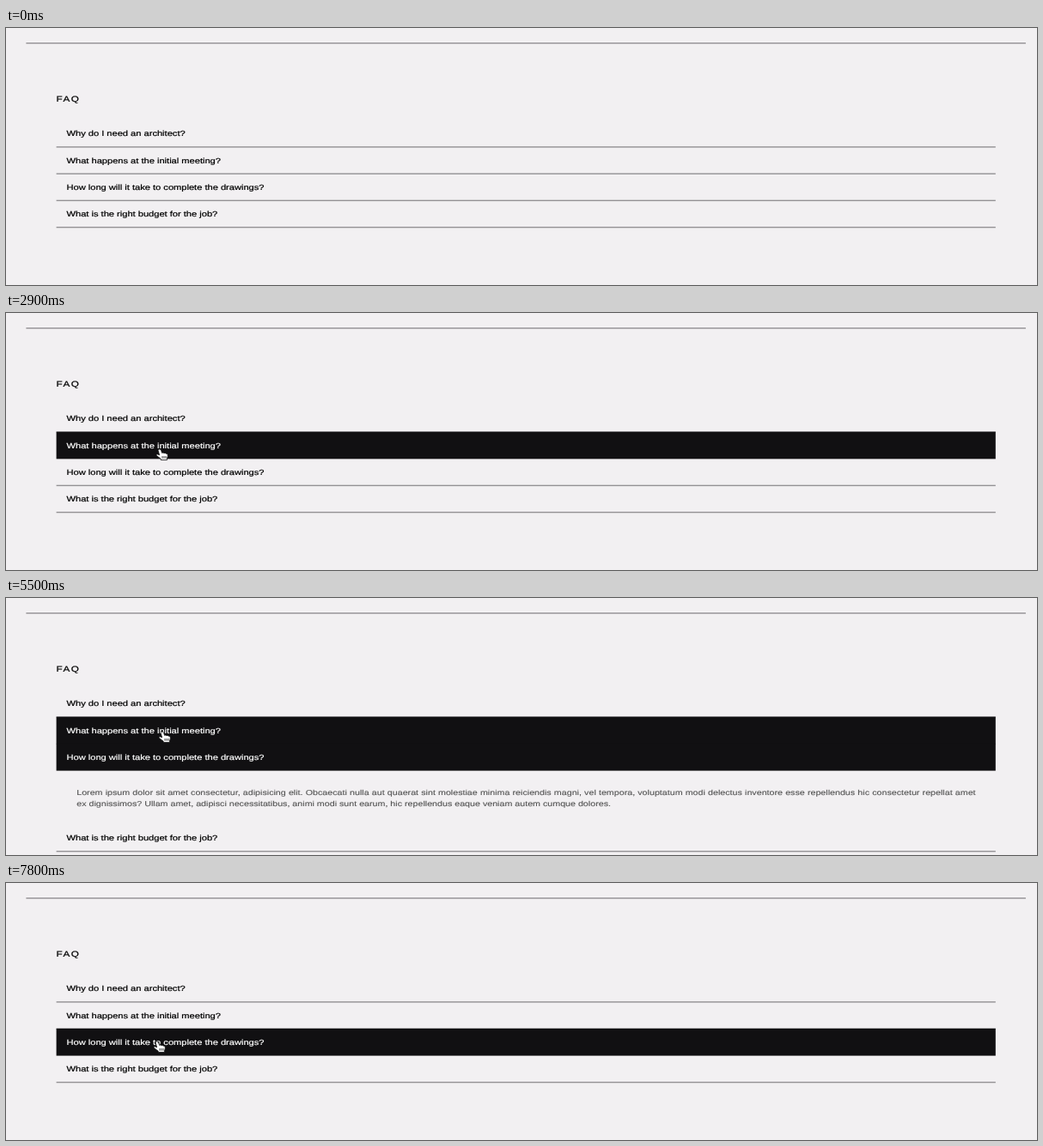
An HTML page for the animation above (8000 ms loop, 1200 by 300 pixels).

```html
<!DOCTYPE html>
<html lang="en">
<head>
<meta charset="utf-8">
<title>FAQ</title>
<style>
  html, body { margin: 0; width: 100%; height: 100%; overflow: hidden; background: #f2f0f2; }
  svg { display: block; width: 1200px; height: 300px; }
  text { font-family: "Liberation Sans", Arial, sans-serif; text-rendering: geometricPrecision; }
  .title { font-size: 9.36px; letter-spacing: 1.15px; stroke: #000; stroke-width: .2; }
  .ask { font-size: 8.9px; stroke-width: .2; }
  .reply { font-size: 8.555px; fill: #555; stroke: #555; stroke-width: .12; }
  .reply:first-child { word-spacing: .17px; }
  .rule { fill: #939194; }
  .bar { fill: #111012; }
</style>
</head>
<body>
<svg viewBox="0 0 1200 300">
  <rect class="rule" x="23.4" y="17" width="1163.5" height="1.4"/>
  <text class="title" transform="translate(58.6 86) scale(1.25 1)">FAQ</text>
  <g id="list"></g>
  <path id="hand" fill="#fff" stroke="#111" stroke-width=".8" stroke-linejoin="round"
    d="M-2 1.2Q-1.8 0-.3 0T1.5 1.2L2.6 4.4Q4 3.4 4.8 4.6Q6.5 4 7.4 5.2Q9 5 9.2 6.4
       Q9.6 9 8.4 10.6V12.6H1.2V11.2L-3.8 7.4Q-4.6 5.9-3 5.7L-.4 6.8Z
       M3 8V10.8M5 8V10.8M7 8V10.8"/>
</svg>
<script>
const LOOP = 8000, STEP = 100, TOP = 107.75, ROW = 31.25, PANEL = 63.1;
const questions = [
  "Why do I need an architect?",
  "What happens at the initial meeting?",
  "How long will it take to complete the drawings?",
  "What is the right budget for the job?"
];
const answer = [
  "Lorem ipsum dolor sit amet consectetur, adipisicing elit. Obcaecati nulla aut quaerat sint molestiae minima reiciendis magni, vel tempora, voluptatum modi delectus inventore esse repellendus hic consectetur repellat amet",
  "ex dignissimos? Ullam amet, adipisci necessitatibus, animi modi sunt earum, hic repellendus eaque veniam autem cumque dolores."
];
// Each click toggles one row: [time, row]
const clicks = [[1100, 0], [2400, 0], [3200, 1], [4300, 1], [5100, 2], [6100, 1], [7100, 1], [7800, 2]];
// Pointer moves: [first step, last step, x, y]
const moves = [
  [300, 800, 199, 114], [2700, 2900, 179, 159], [3600, 3700, 193, 157], [4700, 4800, 176, 185],
  [5400, 5500, 182, 156], [6800, 6900, 190, 156], [7300, 7500, 176, 185]
];

function add(parent, tag, attrs, text = "") {
  const el = document.createElementNS("http://www.w3.org/2000/svg", tag);
  for (const k in attrs) el.setAttribute(k, attrs[k]);
  el.textContent = text;
  return parent.appendChild(el);
}
const place = (el, x, y) => el.setAttribute("transform", `translate(${x} ${y})`);
const show = (el, on) => el.style.display = on ? "" : "none";
const label = (parent, cls, x, y, text) =>
  add(parent, "text", { class: cls, transform: `translate(${x} ${y}) scale(1.25 1)` }, text);
const block = (parent, cls, y, height) =>
  add(parent, "rect", { class: cls, x: 58.6, y, width: 1093.2, height });

const list = document.getElementById("list"), hand = document.getElementById("hand");
const rows = questions.map(q => {
  const g = add(list, "g", {});
  const rule = block(g, "rule", ROW - .8, 1.4);
  const bar = block(g, "bar", -.3, ROW + .4);
  const ask = label(g, "ask", 70.5, 18.5, q);
  const panel = add(g, "g", {});
  answer.forEach((line, i) => label(panel, "reply", 82.2, 60.2 + i * 12.4, line));
  return { g, rule, bar, ask, panel };
});

function pointer(t) {
  let x = 250, y = -20;
  for (const [a, b, mx, my] of moves) {
    if (t < a) break;
    const p = Math.min(1, (t - a + STEP) / (b - a + STEP)), e = p * (2 - p);
    x += (mx - x) * e;
    y += (my - y) * e;
  }
  return [x, y];
}

function draw(now) {
  const t = Math.floor(now % LOOP / STEP) * STEP;
  const [x, y] = pointer(t);
  show(hand, t >= moves[0][0]);
  place(hand, x, y);
  let top = TOP;
  rows.forEach((r, i) => {
    const open = clicks.filter(([at, row]) => row === i && at <= t).length % 2 === 1;
    const active = open || (y >= top && y < top + ROW);
    const ink = active ? "#fff" : "#000";
    place(r.g, 0, top);
    show(r.bar, active);
    show(r.rule, !active);
    show(r.panel, open);
    r.ask.setAttribute("fill", ink);
    r.ask.setAttribute("stroke", ink);
    top += ROW + (open ? PANEL : 0);
  });
}

const start = performance.now();
function tick() {
  draw(performance.now() - start);
  requestAnimationFrame(tick);
}
tick();
</script>
</body>
</html>
```
